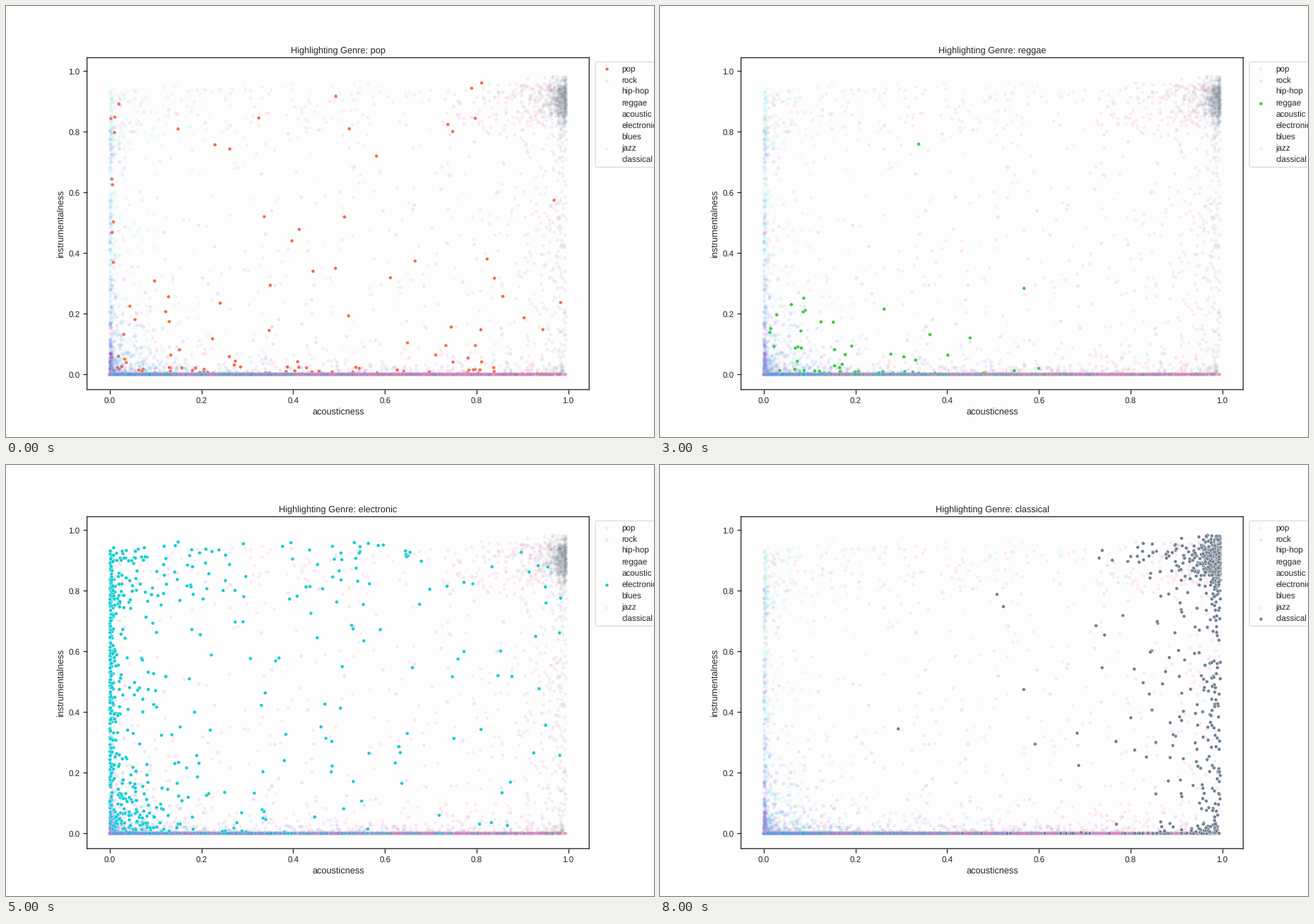
Write a matplotlib script that moves like this. It is 917 by 611 pixels and loops after 9000 ms.

```python
import numpy as np
import matplotlib.pyplot as plt
from matplotlib.animation import FuncAnimation
from matplotlib.colors import to_rgba

W, H, DPI = 917, 611, 76.4
INK, PAPER = "#262626", "#fdfdfd"
SIZE, EDGE = 21, 0.4
TOP = 0.996

COLORS = {
    "pop": "tomato",
    "rock": "blueviolet",
    "hip-hop": "royalblue",
    "reggae": "limegreen",
    "acoustic": "orchid",
    "electronic": "darkturquoise",
    "blues": "dodgerblue",
    "jazz": "hotpink",
    "classical": "slategray",
}
GENRES = list(COLORS)
FADE = {"electronic": 0.06, "pop": 0.12, "rock": 0.12, "jazz": 0.12}
FAINT_KEYS = {"pop", "rock", "jazz"}

rng = np.random.default_rng(12)


def cloud(x, y):
    pts = np.column_stack([x, y])
    inside = (pts >= 0).all(axis=1) & (pts <= (TOP, 0.985)).all(axis=1)
    return pts[inside]


def floor(n, a, b):
    """Vocal tracks: instrumentalness close to zero."""
    return cloud(rng.beta(a, b, n) * 0.995, rng.exponential(0.0005, n))


def haze(n, a, b, height):
    """Layer that thins out above the floor."""
    return cloud(rng.beta(a, b, n) * 0.99, rng.exponential(height, n))


def corner(n, sx, sy):
    """Tracks crowding towards the origin."""
    return cloud(rng.exponential(sx, n), rng.exponential(sy, n))


def box(n, x0, x1, y0, y1):
    return cloud(rng.uniform(x0, x1, n), rng.uniform(y0, y1, n))


def left(n, sx, y0, y1):
    """Column leaning on the left side."""
    return cloud(rng.exponential(sx, n), rng.uniform(y0, y1, n))


def right(n, sx, y0, y1):
    """Column leaning on the right side."""
    return cloud(TOP - rng.exponential(sx, n), rng.uniform(y0, y1, n))


def blob(n, sx, y, sy):
    """Cluster at height y on the right side."""
    return cloud(TOP - rng.exponential(sx, n), rng.normal(y, sy, n))


def build():
    parts = {
        "pop": [floor(850, 0.6, 1.6), box(26, 0, 0.99, 0.25, 0.97),
                left(8, 0.01, 0.1, 0.85), haze(50, 0.6, 0.9, 0.09),
                haze(60, 0.6, 1.3, 0.012)],
        "rock": [floor(650, 0.5, 1.8), box(26, 0, 0.99, 0.25, 0.95),
                 left(32, 0.002, 0.1, 0.87), left(14, 0.03, 0.2, 0.9),
                 corner(75, 0.002, 0.06), corner(50, 0.04, 0.08),
                 haze(45, 0.6, 1.3, 0.1), haze(50, 0.6, 1.4, 0.012)],
        "hip-hop": [floor(900, 0.7, 2.4), haze(40, 0.6, 2.2, 0.02),
                    corner(25, 0.05, 0.1)],
        "reggae": [floor(850, 0.8, 2.2), corner(34, 0.16, 0.17),
                   haze(45, 0.7, 2.4, 0.006)],
        "acoustic": [floor(800, 2.2, 1.2), haze(60, 1.4, 1.0, 0.02),
                     box(12, 0.1, 0.95, 0.05, 0.5)],
        "electronic": [floor(280, 0.6, 1.7), left(190, 0.003, 0, 0.93),
                       left(75, 0.025, 0, 0.95), left(65, 0.075, 0, 0.6),
                       corner(110, 0.05, 0.07), left(75, 0.06, 0.75, 0.95),
                       box(45, 0.1, 0.55, 0.75, 0.97),
                       box(28, 0.5, 0.99, 0.75, 0.96),
                       box(45, 0.1, 0.65, 0.05, 0.75),
                       box(18, 0.65, 0.99, 0.02, 0.72),
                       haze(40, 0.5, 1.2, 0.03)],
        "blues": [floor(800, 0.5, 1.7), haze(90, 0.6, 1.5, 0.02),
                  corner(60, 0.01, 0.07)],
        "jazz": [floor(480, 1.3, 0.95), haze(110, 1.0, 0.75, 0.03),
                 box(95, 0, 0.8, 0.82, 0.95), box(40, 0.8, 0.9, 0.8, 0.96),
                 box(70, 0.9, 0.99, 0.82, 0.96),
                 box(65, 0.9, 0.995, 0.02, 0.82),
                 box(65, 0.1, 0.75, 0.2, 0.82), box(32, 0.7, 0.9, 0.05, 0.8),
                 left(26, 0.04, 0.1, 0.93), corner(20, 0.003, 0.04)],
        "classical": [blob(400, 0.011, 0.905, 0.038),
                      blob(130, 0.055, 0.91, 0.035),
                      right(125, 0.028, 0.05, 0.83),
                      right(65, 0.13, 0.2, 0.97),
                      floor(75, 5, 0.8), haze(50, 12, 0.6, 0.02)],
    }
    tracks = [np.vstack(parts[g]) for g in GENRES]
    label = np.repeat(np.arange(len(GENRES)), [len(t) for t in tracks])
    return np.vstack(tracks), label


def shades(pick):
    """Face and edge colours per genre with one of them lit."""
    face, edge = [], []
    for i, g in enumerate(GENRES):
        a = 1 if i == pick else FADE.get(g, 0.1)
        face.append(to_rgba(COLORS[g], a))
        edge.append((1, 1, 1, a))
    return np.array(face), np.array(edge)


plt.rcParams.update({
    "font.family": "Liberation Sans",
    "font.size": 12,
    "text.hinting": "none",
    "path.snap": False,
    "text.color": INK, "axes.labelcolor": INK, "axes.edgecolor": INK,
    "xtick.color": INK, "ytick.color": INK,
    "axes.linewidth": 1.25, "axes.titlesize": 12, "axes.labelsize": 12,
    "xtick.labelsize": 11, "ytick.labelsize": 11, "legend.fontsize": 11,
    "xtick.major.size": 6, "ytick.major.size": 6,
    "xtick.major.width": 1.25, "ytick.major.width": 1.25,
    "figure.facecolor": PAPER, "axes.facecolor": PAPER,
})

fig, ax = plt.subplots(figsize=((W + 0.01) / DPI, (H + 0.01) / DPI), dpi=DPI)
ax.set(xlim=(-0.0499, 1.0457), ylim=(-0.0497, 1.0437),
       xlabel="acousticness", ylabel="instrumentalness")
title = ax.set_title("")

tracks, label = build()
dots = ax.scatter(*tracks.T, s=SIZE, linewidths=EDGE)

keys = [ax.scatter([], [], s=SIZE, linewidths=EDGE, label=g) for g in GENRES]
legend = ax.legend(handles=keys, loc="upper left", bbox_to_anchor=(1.004, 1),
                   labelspacing=0.42)


def draw(i):
    face, edge = shades(i)
    dots.set_facecolor(face[label])
    dots.set_edgecolor(edge[label])
    for k, handle in enumerate(legend.legend_handles):
        shown = k == i or GENRES[k] in FAINT_KEYS
        handle.set_facecolor(face[k] if shown else "none")
        handle.set_edgecolor(edge[k] if shown else "none")
    title.set_text(f"Highlighting Genre: {GENRES[i]}")
    return dots, title


anim = FuncAnimation(fig, draw, frames=len(GENRES), interval=1000)
plt.show()
```
